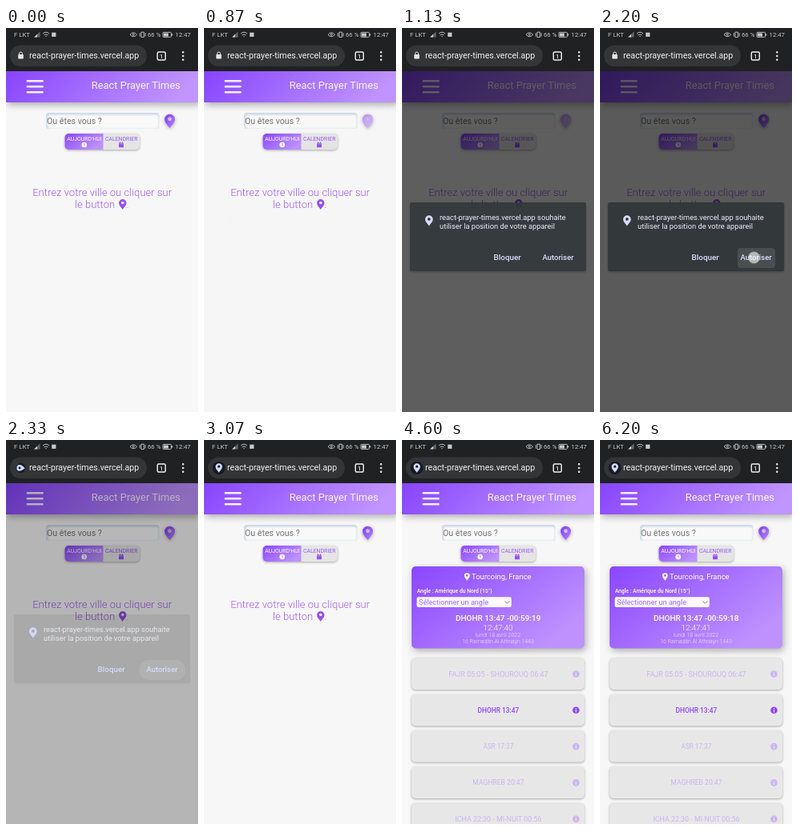
An HTML page for the animation above (6.34 s loop, 240x480 px).

```html
<!DOCTYPE html>
<html lang="fr">
<head>
<meta charset="utf-8">
<title>Prayer times</title>
<style>
  html, body { margin: 0; width: 100%; height: 100%; overflow: hidden; background: #f7f7f7; }
  svg { display: block; width: 100vw; height: 100vh; font-family: Roboto, "Open Sans", sans-serif; }
  .mid { text-anchor: middle; }
  .light { font-weight: 300; }
  .medium { font-weight: 500; }
  .shadow { filter: drop-shadow(.8px 1.5px 1.8px rgba(0,0,0,.32)); }
  .deep { filter: drop-shadow(2px 3px 4px rgba(0,0,0,.3)); }
  .soft { filter: blur(.8px); }
</style>
</head>
<body>
<svg viewBox="0 0 240 480">
  <defs>
    <linearGradient id="violet" x2="1" y2=".6">
      <stop stop-color="#8b46ff"/><stop offset="1" stop-color="#bd92ff"/>
    </linearGradient>
    <linearGradient id="bar" x2="1" y2=".15">
      <stop stop-color="#8744ff"/><stop offset="1" stop-color="#c095ff"/>
    </linearGradient>
    <linearGradient id="pinFill" x2="1" y2="1">
      <stop offset=".2" stop-color="#8b46ff"/><stop offset="1" stop-color="#b888ff"/>
    </linearGradient>
    <path id="pin" fill-rule="evenodd" d="M0 8.5C-2 5-6.2 2-6.2-2.5A6.2 6 0 0 1 6.2-2.5C6.2 2 2 5 0 8.5ZM0-5A2.4 2.4 0 0 0 0-.2A2.4 2.4 0 0 0 0-5Z"/>
    <g id="calendar">
      <path d="M-3-2.6h6v5.8h-6zM-2-3.6h1v1h-1zM1-3.6h1v1h-1z"/>
      <path d="M-3-1.2h6" stroke="#e5e5e5" stroke-width=".5"/>
    </g>
  </defs>
  <rect width="240" height="480" fill="#f7f7f7"/>

  <!-- page -->
  <rect y="54" width="240" height="39" fill="url(#bar)" class="deep"/>
  <path d="M26.7 66.3H45.7M26.7 73.3H45.7M26.7 80.3H45.7" stroke="#f7f2ff" stroke-width="2.4" stroke-linecap="round"/>
  <text x="218" y="76" font-size="12.95" text-anchor="end" fill="#f8f3ff">React Prayer Times</text>

  <rect x="50" y="106" width="141.5" height="20" rx="3.5" fill="#cdd7e4"/>
  <rect x="52" y="108.5" width="139" height="17.5" rx="3" fill="#f9f9fa" class="soft"/>
  <text x="51" y="119.8" font-size="10.65" fill="#757575">Ou êtes vous ?</text>
  <g transform="translate(204.7 116.5) scale(1.04)">
    <use href="#pin" fill="url(#pinFill)" class="shadow"/>
    <use id="glow" href="#pin" fill="#eee4ff"/>
  </g>

  <rect x="73.5" y="132" width="93.5" height="20" rx="5" fill="#e5e5e5" class="shadow"/>
  <path d="M121.5 132H78.5a5 5 0 0 0-5 5v10a5 5 0 0 0 5 5h43z" fill="url(#violet)"/>
  <g font-size="6.95" class="mid">
    <text x="98" y="141" fill="#fff">AUJOURD'HUI</text>
    <text x="144.2" y="141" fill="#9a5cf5">CALENDRIER</text>
  </g>
  <circle cx="97.7" cy="146" r="3.3" fill="#fff"/>
  <path d="M97.7 144v2.2l1.4.8" fill="none" stroke="#9a5cf5" stroke-width=".7"/>
  <use href="#calendar" transform="translate(144 146)" fill="#9550f5"/>

  <g id="hint" fill="#a15df4" class="light" font-size="13.1">
    <text x="120.2" y="210" class="mid">Entrez votre ville ou cliquer sur</text>
    <text x="86" y="225">le button</text>
    <use href="#pin" transform="translate(145.8 220.5) scale(.76)" fill="#954ff0"/>
    <text x="150.6" y="225">.</text>
  </g>

  <g id="result">
    <rect x="12" y="158" width="216" height="102.5" rx="5" fill="url(#violet)" class="deep"/>
    <use href="#pin" transform="translate(81.3 170.9) scale(.56)" fill="#fff"/>
    <g fill="#fff">
      <text x="87" y="174" font-size="9.45">Tourcoing, France</text>
      <text x="18.7" y="191" font-size="6.75" class="medium">Angle : Amérique du Nord (15°)</text>
      <rect x="18.5" y="196.3" width="118.3" height="12.8" rx="2" fill="#fbf8ff"/>
      <text x="21" y="206" font-size="9.1" fill="#a367f7">Sélectionner un angle</text>
      <path d="M128.6 201.5l2.8 2.8 2.8-2.8" fill="none" stroke="#777" stroke-width="1"/>
      <g class="mid">
        <text id="countdown" x="120.2" y="225.5" font-size="9.95" class="medium"></text>
        <text id="clock" x="120" y="237.5" font-size="9.9" class="light"></text>
        <g class="light" fill="#f0e6ff">
          <text x="120" y="246" font-size="7.1">lundi 18 avril 2022</text>
          <text x="120" y="254" font-size="6.9">16 Ramaḍān Al Athnayn 1443</text>
        </g>
      </g>
    </g>
    <g id="rows"></g>
  </g>

  <rect id="scrim" y="54" width="240" height="426"/>

  <!-- permission dialog -->
  <g id="dialog">
    <rect id="panel" x="10" y="218" width="220" height="86" rx="2" fill="#33383a" class="shadow"/>
    <rect id="ripple" y="275" height="25" fill="#fff"/>
    <g id="words" fill="#eceef4" font-size="9.3">
      <use href="#pin" transform="translate(33.8 241) scale(.78)" fill="#d6dcff"/>
      <text x="47" y="240.2">react-prayer-times.vercel.app souhaite</text>
      <text x="47" y="250.7">utiliser la position de votre appareil</text>
      <g fill="#d9dfff" class="medium">
        <text x="114.5" y="290" font-size="9.9">Bloquer</text>
        <text x="175.5" y="290" font-size="9.5">Autoriser</text>
      </g>
    </g>
  </g>
  <circle id="touch" r="7.5" fill="#fff" stroke="#777" stroke-width=".6"/>

  <!-- browser and status bars -->
  <rect width="240" height="54" fill="#202122"/>
  <rect x="5" y="21.5" width="171" height="26.5" rx="13.2" fill="#343537"/>
  <g id="lock" fill="#e6e6e6">
    <rect x="15.2" y="33" width="6.6" height="5.6" rx=".8"/>
    <path d="M16.6 33.5v-1.6a1.9 1.9 0 0 1 3.8 0v1.6" fill="none" stroke="#e6e6e6" stroke-width="1"/>
  </g>
  <g id="badge">
    <circle r="8" fill="#171a26"/>
    <use id="badgePin" href="#pin" fill="#d5ddff"/>
  </g>
  <text x="29" y="38.3" font-size="10.67" fill="#f1f1f1">react-prayer-times.vercel.app</text>
  <rect x="189.3" y="30" width="10" height="10" rx="1.5" fill="none" stroke="#f1f1f1" stroke-width="1.4"/>
  <text x="194.3" y="37.7" font-size="7" class="mid medium" fill="#f1f1f1">1</text>
  <path d="M221.3 30.3v.01M221.3 35v.01M221.3 39.7v.01" stroke="#f1f1f1" stroke-width="2.5" stroke-linecap="round"/>

  <g font-size="7.75" fill="#c9c9c9">
    <text x="10" y="11">F LKT</text>
    <text x="177" y="11">66 %</text>
    <text x="211.6" y="11">12:47</text>
    <path d="M35 11.5h7.5V4.5z" fill="#666"/><path d="M35 11.5h4V7.7z"/>
    <rect x="57.2" y="5.7" width="5.2" height="5.2"/>
    <g fill="none" stroke="#c9c9c9" stroke-width=".9">
      <path d="M46 7q4-3.5 8 0M47.5 8.9q2.5-2 5 0M49.3 10.7h1.4"/>
      <path d="M155 8.3q4.3-5 8.6 0q-4.3 5-8.6 0z"/><circle cx="159.3" cy="8.3" r="1.1"/>
      <path d="M169 5.2h3.5v6.3H169zM167.3 6.2v4.3M174.2 6.2v4.3"/>
      <rect x="196" y="5.4" width="10.6" height="6" rx="1"/>
    </g>
    <path d="M197 6.4h6v4h-6zM207 7.3h1.2v2.2H207z"/>
  </g>
</svg>
<script>
const LOOP = 6340;
const el = id => document.getElementById(id);
const ramp = (t, from, to) => Math.min(1, Math.max(0, (t - from) / (to - from)));
const set = (id, name, v) => el(id).setAttribute(name, v);
const fade = (id, a) => set(id, 'opacity', a);
const move = (id, v) => set(id, 'transform', v);

const prayers = [
  ['FAJR 05:05 - SHOUROUQ 06:47', 9], ['DHOHR 13:47', 8.4], ['ASR 17:37', 8.2],
  ['MAGHREB 20:47', 8.6], ['ICHA 22:30 - MI-NUIT 00:56', 8.9]
];
el('rows').innerHTML = prayers.map(([label, size], i) => {
  const next = i === 1;
  return `<g transform="translate(0 ${272.5 + 45.3 * i})">
    <rect x="12" width="216" height="39.5" rx="5" fill="#e7e7e7" class="shadow"/>
    <g fill="${next ? '#8f45ff' : '#ccb5ee'}">
      <text x="120.4" y="23" font-size="${size}" class="mid ${next ? 'medium' : ''}">${label}</text>
      <circle cx="217.5" cy="20" r="4.3"/>
    </g>
    <path d="M217.5 17.3v1.1M217.5 19.3v3.3" stroke="#e7e7e7" stroke-width="1.2"/>
  </g>`;
}).join('');

function draw(t) {
  const shown = t < 2000 ? ramp(t, 870, 1140) : 1 - ramp(t, 2200, 2425);
  fade('scrim', .64 * shown);
  fade('panel', shown ** 2.8);
  fade('words', Math.min(1, shown * 2.2));

  const grow = ramp(t, 1930, 2330);
  const half = 12 + 17 * grow;
  set('ripple', 'x', 195.5 - half);
  set('ripple', 'width', half * 2);
  set('ripple', 'rx', 4 + 8 * ramp(t, 2200, 2330));
  fade('ripple', t < 1930 ? 0 : .11 * Math.min(1, shown * 2));

  const onAllow = t > 1300;
  move('touch', onAllow ? 'translate(192.5 287)' : 'translate(205 116.5)');
  fade('touch', onAllow
    ? (t >= 1930 ? .6 * (1 - ramp(t, 2210, 2320)) : 0)
    : (t >= 70 ? .6 * (1 - ramp(t, 330, 670)) : 0));
  fade('glow', .55 * ramp(t, 70, 270) * (1 - ramp(t, 1130, 1330)));

  const swap = ramp(t, 2210, 2530);
  fade('lock', 1 - ramp(t, 2210, 2300));
  fade('badge', ramp(t, 2210, 2310));
  move('badge', `translate(18.6 35) scale(${.6 + .4 * swap})`);
  move('badgePin', `rotate(${-140 * (1 - swap)}) scale(${.9 - .22 * swap})`);

  const loaded = t >= 3730;
  fade('hint', loaded ? 0 : 1);
  fade('result', loaded ? ramp(t, 3660, 3870) : 0);
  const sec = t < 4600 ? 39 : t < 5600 ? 40 : 41;
  el('countdown').textContent = 'DHOHR 13:47 -00:59:' + (59 - sec);
  el('clock').textContent = '12:47:' + sec;
}

const start = performance.now();
function tick() {
  draw((performance.now() - start) % LOOP);
  requestAnimationFrame(tick);
}
tick();
</script>
</body>
</html>
```
